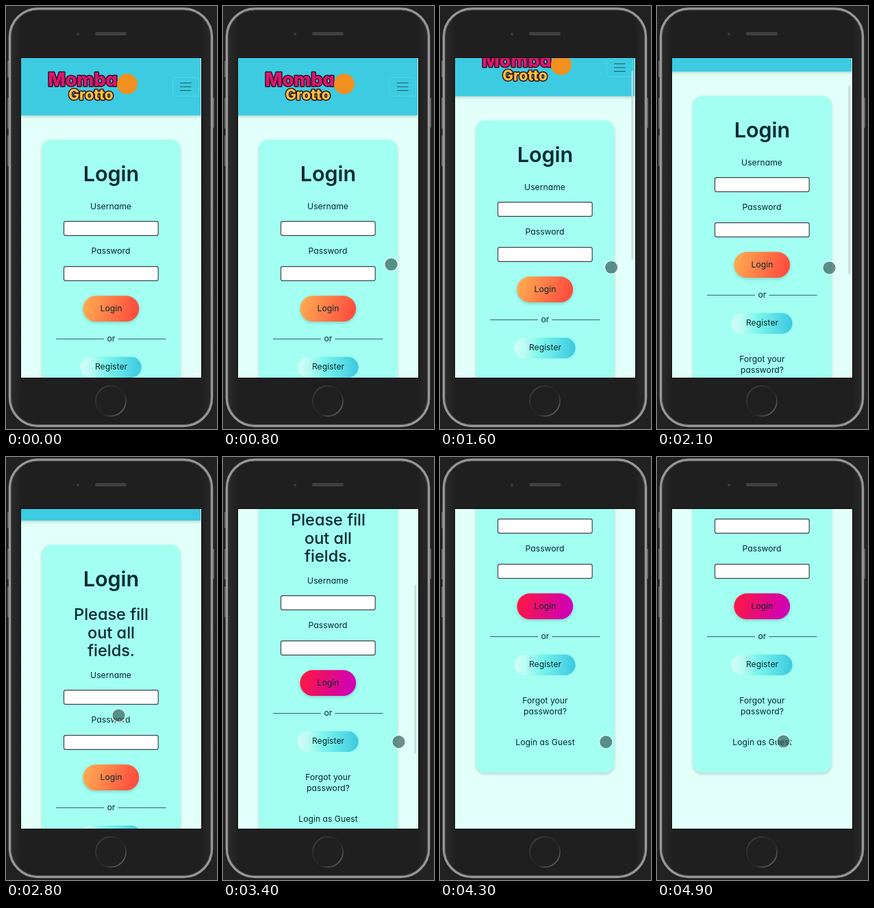
Write an HTML page that moves like this. It is 308 px wide and 618 px high and loops after 5 s.

```html
<!DOCTYPE html>
<html lang="en">
<head>
<meta charset="utf-8">
<title>Login screen</title>
<style>
  html, body { margin: 0; width: 100%; height: 100%; overflow: hidden; background: #212121; }
  svg { display: block; width: 308px; height: 618px; }
  text { font: 400 12.2px Inter, "DejaVu Sans", sans-serif; font-feature-settings: "cv11"; fill: #052b2f; text-anchor: middle; }
  .title { font-size: 30.5px; font-weight: 600; }
  .note { font-size: 23.5px; font-weight: 500; }
  .brand { font-weight: 800; paint-order: stroke; stroke: #35101f; stroke-width: 3px; stroke-linejoin: round; }
  .field { fill: #fff; stroke: #3c4646; stroke-width: 1.2; }
  .rule { stroke: #356461; stroke-width: 1; }
  .soft { filter: drop-shadow(0 2px 2px rgba(0, 40, 40, .2)); }
  .side { fill: #5c5c5c; }
</style>
</head>
<body>
<svg viewBox="0 0 308 618">
  <defs>
    <linearGradient id="warm" x2="1" y2=".15"><stop stop-color="#ffb052"/><stop offset="1" stop-color="#ff4f3f"/></linearGradient>
    <linearGradient id="hot" x2="1" y2=".15"><stop stop-color="#ff1a3c"/><stop offset="1" stop-color="#d000b4"/></linearGradient>
    <linearGradient id="cool"><stop stop-color="#d4fdf8"/><stop offset=".18" stop-color="#b8fbf4"/><stop offset=".42" stop-color="#7cf6ec"/><stop offset="1" stop-color="#3cc8e0"/></linearGradient>
    <linearGradient id="body"><stop stop-color="#2c2c2c"/><stop offset=".06" stop-color="#1f1f1f"/><stop offset=".94" stop-color="#1f1f1f"/><stop offset="1" stop-color="#292929"/></linearGradient>
    <linearGradient id="ring" x2="1" y2="1"><stop stop-color="#484848"/><stop offset=".42" stop-color="#262626"/><stop offset=".6" stop-color="#262626"/><stop offset="1" stop-color="#777"/></linearGradient>
    <clipPath id="screen"><rect x="22" y="76" width="263" height="467"/></clipPath>
  </defs>

  <rect width="308" height="618" fill="#212121"/>
  <rect class="side" x="2" y="80" width="4" height="24" rx="1"/>
  <rect class="side" x="2" y="134" width="4" height="45" rx="1"/>
  <rect class="side" x="2" y="189" width="4" height="45" rx="1"/>
  <rect class="side" x="300" y="134" width="4" height="44" rx="1"/>
  <rect x="5.5" y="4" width="295" height="609.500" rx="41" fill="url(#body)" stroke="#979797" stroke-width="3.5"/>
  <rect x="7.5" y="6" width="291" height="605.500" rx="39" fill="none" stroke="#484848"/>
  <rect x="130" y="38" width="46" height="5" rx="2.5" fill="#404040"/>
  <circle cx="105" cy="41" r="2.6" fill="#30283a"/>
  <circle cx="105" cy="41" r="1.1" fill="#4b4260"/>
  <circle cx="153" cy="577" r="22" fill="#202020" stroke="url(#ring)" stroke-width="1.8"/>
  <rect x="21" y="75" width="265" height="469" fill="#0c0c0c"/>

  <g clip-path="url(#screen)">
    <rect x="22" y="76" width="263" height="467" fill="#e3fff9"/>
    <g id="page">
      <rect class="soft" x="20" y="60" width="264" height="99.800" fill="#3ccbe1"/>
      <text class="brand" x="112" y="117" style="font-size:27px;fill:#dc1670">Momba</text>
      <text class="brand" x="124" y="137" style="font-size:21px;fill:#ffc23c">Grotto</text>
      <circle cx="177" cy="114" r="15" fill="#f0901f"/>
      <rect x="243.5" y="104.5" width="38" height="27" rx="3" fill="none" stroke="#4ed6e6"/>
      <path d="M254 112.5h16.500M254 118h16.500M254 123.500h16.500" stroke="#205a67" stroke-width="1.2"/>

      <rect id="card" class="soft" x="52.300" y="195.300" width="202.400" height="490" rx="14" fill="#a2fff2"/>
      <text class="title" x="153.500" y="256">Login</text>
      <g id="note">
        <text class="note" x="153.500" y="305">Please fill</text>
        <text class="note" x="153.500" y="332">out all</text>
        <text class="note" x="153.500" y="358">fields.</text>
      </g>
      <g id="form">
        <text x="153" y="297">Username</text>
        <rect class="field" x="84.500" y="314.700" width="137.700" height="20.600" rx="2.500"/>
        <text x="153" y="362">Password</text>
        <rect class="field" x="84.500" y="380.700" width="137.700" height="20.600" rx="2.500"/>
        <rect id="login" class="soft" x="112.400" y="423.300" width="81.800" height="37.800" rx="18.900"/>
        <text x="153.500" y="446">Login</text>
        <path class="rule" d="M73 486.500h70M163.500 486.500h70"/>
        <text x="153.500" y="490">or</text>
        <rect x="108.700" y="512.500" width="89" height="30.500" rx="15.250" fill="url(#cool)"/>
        <text x="153.500" y="531">Register</text>
        <text x="153.500" y="583.500">Forgot your</text>
        <text x="153.500" y="600">password?</text>
        <text x="153.500" y="645">Login as Guest</text>
      </g>
    </g>
    <rect id="bar" x="279.300" width="2.800" rx="1.400" fill="#c2d9d6" fill-opacity=".88"/>
    <circle id="dot" r="9.800" fill="#2f5550" fill-opacity=".66" stroke="#e6fffb" stroke-opacity=".9" stroke-width="1.500"/>
  </g>
</svg>
<script>
  const LOOP = 5000, STEP = 100, VIEW = 467, TOP = 76, NOTE = 93;
  const $ = id => document.getElementById(id);
  const set = (id, attrs) => {
    for (const k in attrs) $(id).setAttribute(k, attrs[k]);
  };

  // rows: time, value(s)
  const scrollKeys = [[1100, 0], [1400, 6], [1750, 45], [2100, 64], [2300, 67], [3200, 67],
    [3400, 205], [3600, 308], [3700, 317]];
  const barKeys = [[1100, 0], [1300, 1], [2200, 1], [2600, 0], [3200, 0], [3300, 1], [3700, 1], [4100, 0]];
  const dotKeys = [[100, 200, 556], [400, 236, 410], [600, 245.5, 377.5], [900, 245.5, 377.5], [1400, 249.5, 381.5],
    [2100, 251.5, 382.5], [2500, 158, 379], [2800, 164.5, 377.5], [3000, 166, 446], [3250, 256, 416],
    [3700, 257.5, 416.5], [4200, 257.5, 416.5], [4500, 212, 416], [4700, 184.5, 415.5]];

  function at(keys, t, col = 1) {
    const i = keys.findIndex(k => k[0] > t);
    if (i === 0) return keys[0][col];
    if (i < 0) return keys[keys.length - 1][col];
    const a = keys[i - 1], b = keys[i];
    return a[col] + (b[col] - a[col]) * (t - a[0]) / (b[0] - a[0]);
  }

  function draw(t) {
    const scroll = Math.round(at(scrollKeys, t));
    const noted = t >= 2700;
    const extra = noted ? NOTE : 0;
    const hot = (t >= 2400 && t < 2700) || t >= 3000;
    const total = 791 + extra;

    set("page", { transform: `translate(0 ${-scroll})` });
    set("form", { transform: `translate(0 ${extra})` });
    set("card", { height: 490 + extra });
    set("note", { visibility: noted ? "visible" : "hidden" });
    set("login", { fill: hot ? "url(#hot)" : "url(#warm)" });
    set("bar", {
      y: TOP + 2.5 + scroll * VIEW / total,
      height: VIEW * VIEW / total,
      opacity: at(barKeys, t)
    });
    set("dot", { cx: at(dotKeys, t), cy: at(dotKeys, t, 2), opacity: t < 100 ? 0 : 1 });
  }

  const start = performance.now();
  function tick() {
    const t = (performance.now() - start) % LOOP;
    draw(Math.floor(t / STEP) * STEP);
    requestAnimationFrame(tick);
  }
  tick();
</script>
</body>
</html>
```
